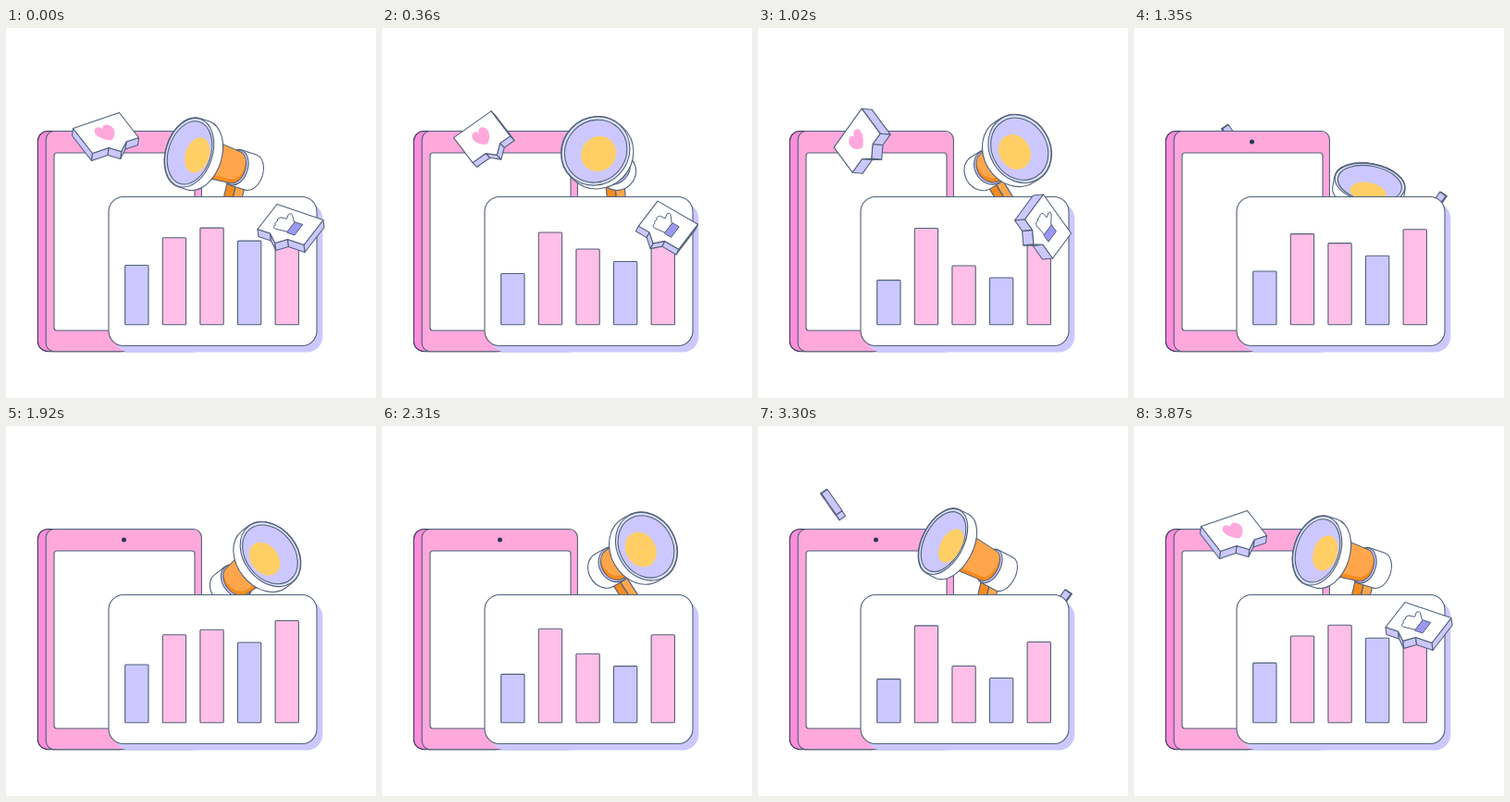
An HTML page with a canvas that plays this animation: 400x400 px, repeating every 3900 ms.

```html
<!DOCTYPE html>
<html lang="en">
<head>
<meta charset="utf-8">
<title>Campaign dashboard</title>
<style>
html, body { margin: 0; width: 100%; height: 100%; overflow: hidden; background: #fff; }
canvas { display: block; width: 400px; height: 400px; }
</style>
</head>
<body>
<canvas id="stage"></canvas>
<script>
const LOOP = 3900, STEP = 30;
const C = {
  line: '#4f6078', dark: '#2c3654', pink: '#ffa8dc', side: '#ff8edb', barPink: '#ffbfe6',
  lav: '#ccc8ff', ring: '#dee2ff', cuff: '#9c98f4',
  orange: '#ffa64d', deep: '#f68b1f', yellow: '#ffcf66'
};

const canvas = document.getElementById('stage');
const ctx = canvas.getContext('2d');
const dpr = window.devicePixelRatio || 1;
canvas.width = canvas.height = 400 * dpr;

// Smooth rise from 0 to 1 between two times.
function ramp(t, from, to) {
  const x = Math.min(1, Math.max(0, (t - from) / (to - from)));
  return x * x * (3 - 2 * x);
}
const mix = (a, b, x) => a.map((v, i) => v + (b[i] - v) * x);

function paint(fill, stroke, width = 1.1) {
  if (fill) { ctx.fillStyle = fill; ctx.fill(); }
  if (stroke) { ctx.strokeStyle = stroke; ctx.lineWidth = width; ctx.stroke(); }
}
function box(x, y, w, h, r, fill, stroke) {
  ctx.beginPath();
  ctx.roundRect(x, y, w, h, r);
  paint(fill, stroke);
}
function poly(pts, fill, stroke) {
  ctx.beginPath();
  pts.forEach(p => ctx.lineTo(p[0], p[1]));
  ctx.closePath();
  paint(fill, stroke);
}

function drawTablet() {
  box(34.3, 111.5, 100, 238.2, 11, C.side, C.dark);
  box(43.2, 111.5, 168.2, 238.2, 9, C.pink, C.line);
  box(52, 135, 152, 192, 3, '#fff', C.line);
  ctx.beginPath();
  ctx.arc(127.5, 123, 2.5, 0, 7);
  paint(C.dark);
}

function drawCard(t) {
  box(117, 189, 225.3, 161.5, 17, C.lav);
  box(111, 182.5, 225, 161, 16, '#fff', C.line);
  const s = ramp(t, -80, 800) - ramp(t, 820, 1720) + ramp(t, 1720, 2700) - ramp(t, 3180, 3900);
  const tops = [256 + 19 * s, 227 - 12 * s, 215 + 48 * s, 229 + 47 * s, 207.5 + 28 * s];
  tops.forEach((y, i) => {
    box(128.7 + 40.6 * i, y, 25.3, 320.7 - y, 1, i % 3 ? C.barPink : C.lav, C.line);
  });
}

// Cap position and aim: turn right, duck behind the card, return, turn left with a nod.
function hornPose(t) {
  const dip = ramp(t, 1000, 1500) - ramp(t, 1500, 2080);
  const nod = ramp(t, 3000, 3280) - ramp(t, 3320, 3750);
  const swing = -.72 + 1.18 * ramp(t, 0, 850) + .2 * ramp(t, 1500, 2080) - 1.38 * ramp(t, 2080, 3150);
  return {
    px: 250 - 20 * swing + 2 * nod,
    py: 156 + 112 * dip + 4 * nod,
    ux: swing * (1 - .85 * dip),
    uy: -.26 - .04 * swing - .7 * dip - .15 * nod
  };
}

function drawHorn(t) {
  const { px, py, ux, uy } = hornPose(t);
  const len = Math.hypot(ux, uy), k = Math.sqrt(Math.max(.02, 1 - len * len));
  const angle = Math.atan2(uy, ux), nx = -uy / len, ny = ux / len;
  const at = d => [px + ux * d, py + uy * d];
  const disc = (d, r) => {
    const [x, y] = at(d);
    ctx.moveTo(x + r * k * Math.cos(angle), y + r * k * Math.sin(angle));
    ctx.ellipse(x, y, r * k, r, angle, 0, Math.PI * 2);
  };
  const oval = (d, r, fill, stroke) => {
    ctx.beginPath();
    disc(d, r);
    paint(fill, stroke);
  };
  const tubePath = (d1, r1, d2, r2) => {
    const [x1, y1] = at(d1), [x2, y2] = at(d2);
    ctx.beginPath();
    disc(d1, r1);
    disc(d2, r2);
    ctx.moveTo(x1 - nx * r1, y1 - ny * r1);
    ctx.lineTo(x2 - nx * r2, y2 - ny * r2);
    ctx.lineTo(x2 + nx * r2, y2 + ny * r2);
    ctx.lineTo(x1 + nx * r1, y1 + ny * r1);
    ctx.closePath();
  };
  // Stroke first, then fill, so only the silhouette keeps its line.
  const tube = (d1, r1, d2, r2, fill) => {
    tubePath(d1, r1, d2, r2);
    paint(null, C.line, 2.1);
    paint(fill);
  };

  const [hx, hy] = at(20), ex = hx + 9.7 + 24.6 * ux, ey = hy + 42;
  poly([[hx - 9, hy + 8], [hx + 1, hy + 8], [ex + 1, ey], [ex - 9, ey]], C.deep, C.line);
  poly([[hx + 1, hy + 8], [hx + 11, hy + 8], [ex + 11, ey], [ex + 1, ey]], C.orange, C.line);

  tube(0, 19.5, 22, 19.5, '#fff');
  oval(22, 19.5, C.lav, C.line);
  tube(24, 17.3, 76, 21, C.deep);
  ctx.save();
  tubePath(24, 17.3, 76, 21);
  ctx.clip();
  ctx.translate(0, -4);
  tubePath(24, 17.3, 76, 21);
  paint(C.orange);
  ctx.restore();

  tube(79, 38.3, 92, 38.3, '#fff');
  oval(92, 38.3, C.ring, C.line);
  oval(91.5, 35, C.lav, C.line);
  ctx.save();
  ctx.beginPath();
  disc(91.5, 34.4);
  ctx.clip();
  oval(80, 19.7, C.yellow);
  ctx.restore();
}

function heartIcon() {
  ctx.beginPath();
  ctx.moveTo(.5, .79);
  ctx.bezierCurveTo(.34, .68, .25, .4, .36, .26);
  ctx.bezierCurveTo(.42, .2, .48, .25, .5, .34);
  ctx.bezierCurveTo(.52, .25, .58, .2, .64, .26);
  ctx.bezierCurveTo(.75, .4, .66, .68, .5, .79);
}
function fistIcon() {
  ctx.beginPath();
  ctx.moveTo(.54, .76);
  ctx.lineTo(.3, .8);
  ctx.quadraticCurveTo(.22, .78, .25, .68);
  ctx.quadraticCurveTo(.19, .62, .23, .54);
  ctx.quadraticCurveTo(.18, .46, .24, .38);
  ctx.lineTo(.36, .36);
  ctx.lineTo(.33, .2);
  ctx.quadraticCurveTo(.37, .1, .42, .2);
  ctx.lineTo(.54, .4);
  ctx.closePath();
}
function cuffIcon() {
  ctx.beginPath();
  ctx.rect(.54, .37, .17, .42);
}

// Each pose holds the width, height and depth vectors of a badge.
const FLAT = [50, -17, 21, 27, -1, 8];
const TILTED = [30, -42, 20, 27, 11, 1];
const EDGE = [1, 0, 16, 23, 6.5, -4.5];

const heart = { home: [108, 113.5], hop: [-32, -29], hide: [0, 32], lean: [0, 9], lag: 0 };
const thumb = { home: [307.5, 212.5], hop: [36, -32], hide: [-22, 24], lean: [6, 2], lag: 75, mirror: true };

const localTime = (badge, t) => (t - badge.lag + LOOP) % LOOP;
function isBehind(badge, t) {
  const u = localTime(badge, t);
  return u > 1200 && u < 3310;
}

function drawBadge(badge, time) {
  const t = localTime(badge, time), { mirror } = badge;
  const turn = ramp(t, 0, 750) - ramp(t, 1500, 3000);
  const shown = 1 - ramp(t, 1050, 1200) + ramp(t, 3300, 3750);
  const hop = ramp(t, 1000, 1200) - ramp(t, 1200, 1400) + ramp(t, 3080, 3280) - ramp(t, 3320, 3800);
  const hide = ramp(t, 1200, 1570) - ramp(t, 3100, 3290);
  const [cx, cy] = badge.home.map((v, i) =>
    v + hop * badge.hop[i] + hide * badge.hide[i] + turn * shown * badge.lean[i]);

  let [ax, ay, bx, by, dx, dy] = mix(EDGE, mix(FLAT, TILTED, turn), shown);
  if (mirror) { ay = -ay; bx = -bx; dx = -dx; }
  const ox = cx - (ax + bx) / 2, oy = cy - (ay + by) / 2;
  let shape = [[0, 0], [1, 0], [1, 1], [.73, 1], [.52, 1.25], [.35, 1], [0, 1]];
  if (mirror) shape = shape.map(([u, v]) => [1 - u, v]).reverse();
  const face = shape.map(([u, v]) => [ox + ax * u + bx * v, oy + ay * u + by * v]);

  // Visible sides first, nearest last, then the face on top.
  const depth = ([p, q]) => (p[0] + q[0]) * dx + (p[1] + q[1]) * dy;
  ctx.lineJoin = 'round';
  face.map((p, i) => [p, face[(i + 1) % face.length]])
    .filter(([p, q]) => (q[1] - p[1]) * dx - (q[0] - p[0]) * dy > 0)
    .sort((m, n) => depth(m) - depth(n))
    .forEach(([p, q]) => poly([p, q, [q[0] + dx, q[1] + dy], [p[0] + dx, p[1] + dy]], C.lav, C.line));
  poly(face, '#fff', C.line);

  const icon = (path, fill, stroke) => {
    ctx.save();
    ctx.transform(ax, ay, bx, by, ox, oy);
    path();
    ctx.restore();
    paint(fill, stroke, 1);
  };
  if (mirror) {
    icon(cuffIcon, C.cuff, C.line);
    icon(fistIcon, '#fff', C.line);
  } else {
    icon(heartIcon, C.pink);
  }
}

function draw(t) {
  ctx.setTransform(dpr, 0, 0, dpr, 0, 0);
  ctx.fillStyle = '#fff';
  ctx.fillRect(0, 0, 400, 400);
  const heartBack = isBehind(heart, t), thumbBack = isBehind(thumb, t);

  if (heartBack) drawBadge(heart, t);
  drawTablet();
  drawHorn(t);
  if (thumbBack) drawBadge(thumb, t);
  drawCard(t);
  if (!heartBack) drawBadge(heart, t);
  if (!thumbBack) drawBadge(thumb, t);
}

const start = performance.now();
function tick() {
  const t = (performance.now() - start) % LOOP;
  draw(Math.floor(t / STEP) * STEP);
  requestAnimationFrame(tick);
}
tick();
</script>
</body>
</html>
```
